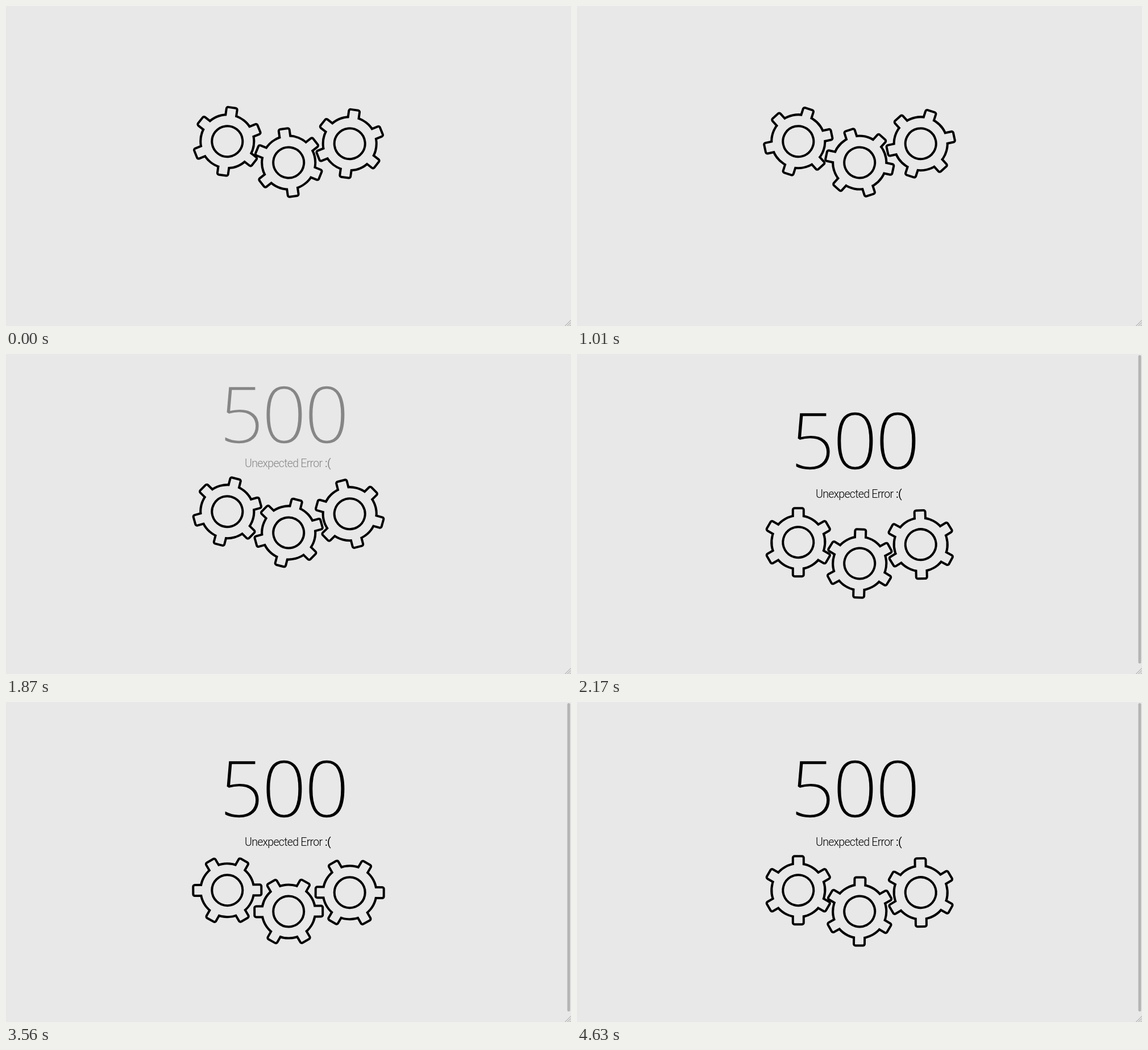
These frames come from a looping animation (994 px wide and 563 px high, 5.13 s). An HTML page:

```html
<!DOCTYPE html>
<html lang="en">
<head>
<meta charset="utf-8">
<title>500</title>
<style>
  html, body { margin: 0; height: 100%; overflow: hidden; background: #e8e8e8; }
  svg { display: block; width: 994px; height: 563px; }
  #code { font: 300 138px "Open Sans", "Noto Sans", sans-serif; letter-spacing: -3.8px; stroke: #e8e8e8; stroke-width: 1.5px; }
  #message { font: 300 19.5px Roboto, "Open Sans", sans-serif; letter-spacing: -.7px; }
  #message .face { font-weight: 400; }
</style>
</head>
<body>
<svg viewBox="0 0 994 563">
  <defs>
    <g id="body">
      <circle r="45"/>
      <rect id="bar" x="-58" y="-7.5" width="116" height="15" rx="1"/>
      <use href="#bar" transform="rotate(60)"/>
      <use href="#bar" transform="rotate(120)"/>
    </g>
    <g id="gear">
      <use href="#body" stroke="#000" stroke-width="8" stroke-linejoin="round"/>
      <use href="#body" fill="#e8e8e8"/>
      <circle r="27" fill="none" stroke="#000" stroke-width="4"/>
    </g>
  </defs>
  <text id="code" x="487.6" y="203" text-anchor="middle">500</text>
  <g id="message">
    <text x="420" y="252.5">Unexpected Error</text>
    <text class="face" x="561" y="252.5">:(</text>
  </g>
  <g id="gears">
    <use href="#gear"/>
    <use href="#gear"/>
    <use href="#gear"/>
  </g>
  <rect id="scrollbar" x="987.5" y="2" width="5" height="542.5" rx="2.5" fill="#b4b4b4"/>
  <path d="M983.5 563L994 552.5M987.5 563L994 556.5M991.5 563L994 560.5" stroke="#8c8c8c" stroke-width=".9"/>
</svg>
<script>
const LOOP = 5130, LAST_MOVE = 4630;
const LOADED = 1676, REVEAL = 465;
const SPIN = 2800, JAM = 1880;
const CENTERS = [[389.3, 331.2], [497.2, 368.5], [604.7, 335.2]];

// Keyframes as [fraction of cycle, degrees]
const STOP = [[0, 0], [.2, 30], [.6, 30], [1, 0]];
const SHAKE = [[0, 0], [.2, 30], [.4, 25], [.6, 30], [1, 0]];

const $ = id => document.getElementById(id);
const gears = [...$("gears").children];

function sample(keys, x) {
  const i = keys.findIndex(key => key[0] > x);
  const [x0, y0] = keys[i - 1], [x1, y1] = keys[i];
  return y0 + (y1 - y0) * (x - x0) / (x1 - x0);
}

function angles(t) {
  if (t < LOADED) {
    const a = 37.9 + 360 * t / SPIN;
    return [a, -a, a];
  }
  const x = (t - LOADED) / JAM % 1, shake = sample(SHAKE, x);
  return [-sample(STOP, x), -shake, shake];
}

function draw(t) {
  const shown = Math.min(1, Math.max(0, (t - LOADED) / REVEAL));
  const lift = (id, distance) =>
    $(id).setAttribute("transform", `translate(0 ${-distance * (1 - shown)})`);
  lift("code", 78.5);
  lift("message", 93);
  lift("gears", 93);
  $("code").style.opacity = $("message").style.opacity = shown;
  $("scrollbar").style.opacity = shown > .95 ? 1 : 0;
  angles(t).forEach((a, i) =>
    gears[i].setAttribute("transform", `translate(${CENTERS[i]}) rotate(${a})`));
}

const start = performance.now();
function tick() {
  draw(Math.min((performance.now() - start) % LOOP, LAST_MOVE));
  requestAnimationFrame(tick);
}
tick();
</script>
</body>
</html>
```
